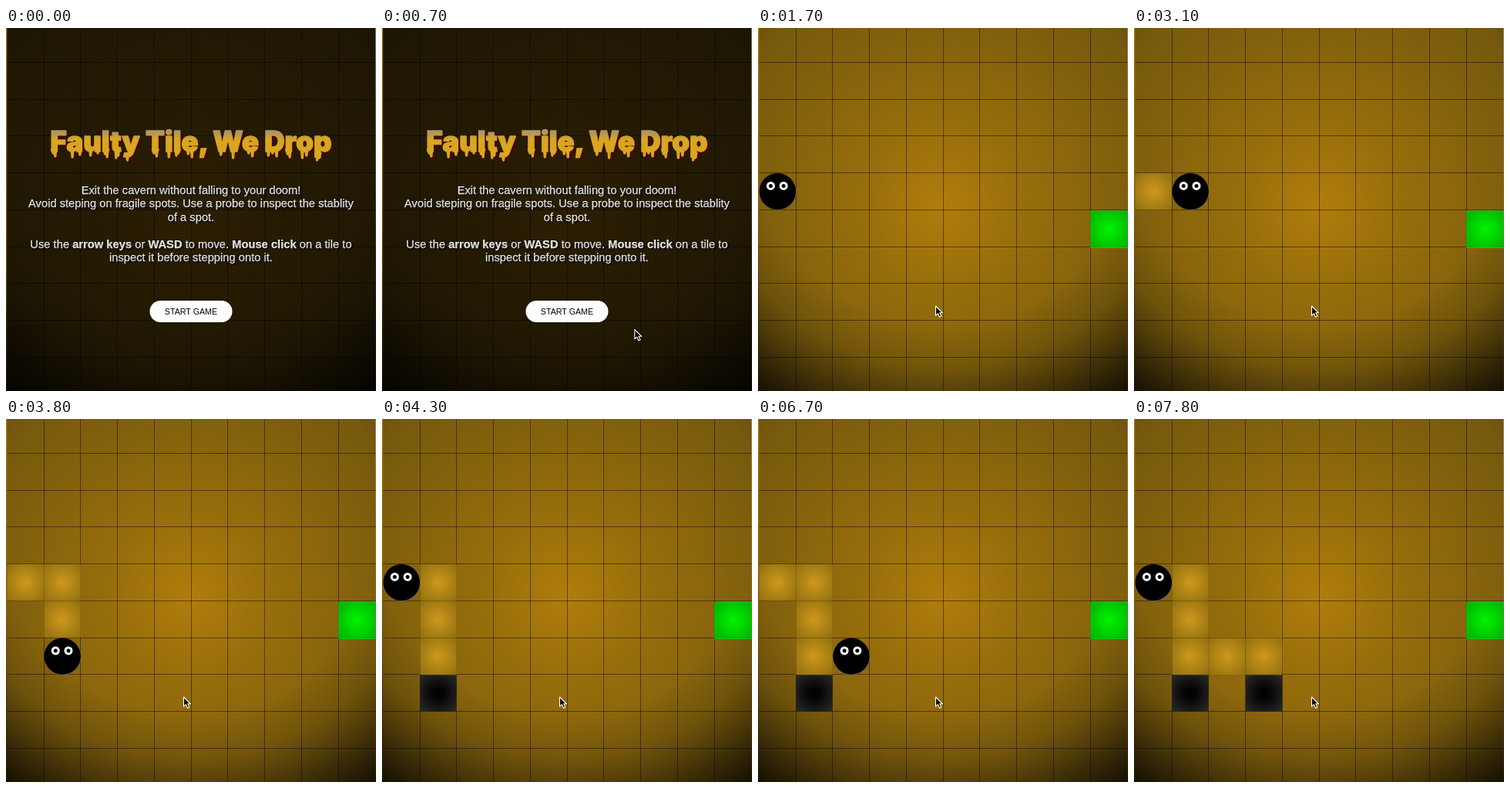
An HTML page for the animation above (8000 ms loop, 480x470 px).

```html
<!DOCTYPE html>
<html lang="en">
<head>
<meta charset="utf-8">
<title>Cavern game</title>
<style>
  html, body { margin: 0; width: 100%; height: 100%; overflow: hidden; background: #000; }
  svg { display: block; width: 480px; height: 470px; }
  text { text-anchor: middle; }
  .copy { font: 14.73px "Liberation Sans", Arial, sans-serif; fill: #fff; stroke: #fff; stroke-width: .25; text-shadow: 1px 1px 2px #000; }
  .copy tspan { font-weight: bold; }
  .label { font: 10.7px "Liberation Sans", Arial, sans-serif; }
  .title { font: 900 36.4px Inter, Roboto, sans-serif; }
</style>
</head>
<body>
<svg id="stage" viewBox="0 0 480 470" xmlns="http://www.w3.org/2000/svg">
  <defs>
    <radialGradient id="floor" gradientUnits="userSpaceOnUse" cx="240" cy="230" r="340">
      <stop offset="0" stop-color="#b07d0c"/>
      <stop offset=".33" stop-color="#966d0b"/>
      <stop offset=".7" stop-color="#80600d"/>
      <stop offset="1" stop-color="#72560f"/>
    </radialGradient>
    <radialGradient id="shade" gradientUnits="userSpaceOnUse" cx="240" cy="130" r="420">
      <stop offset=".6" stop-opacity="0"/>
      <stop offset=".74" stop-opacity=".14"/>
      <stop offset=".82" stop-opacity=".34"/>
      <stop offset="1" stop-opacity=".84"/>
    </radialGradient>
    <radialGradient id="gold" r=".68">
      <stop offset="0" stop-color="#cd981c"/>
      <stop offset="1" stop-color="#92700f"/>
    </radialGradient>
    <radialGradient id="hole" r=".7">
      <stop offset="0" stop-color="#000"/>
      <stop offset=".25" stop-color="#060606"/>
      <stop offset="1" stop-color="#2b2b2b"/>
    </radialGradient>
    <radialGradient id="green" r=".7">
      <stop offset="0" stop-color="#00f400"/>
      <stop offset="1" stop-color="#00ae00"/>
    </radialGradient>
    <linearGradient id="rim" x2="0" y2="1">
      <stop offset="0" stop-color="#b87c05"/>
      <stop offset=".5" stop-color="#8a5f05"/>
      <stop offset="1" stop-color="#1c1403"/>
    </linearGradient>
    <linearGradient id="glint" x2="0" y2="1">
      <stop offset="0" stop-color="#a89c84" stop-opacity=".8"/>
      <stop offset=".4" stop-color="#8a7a50" stop-opacity=".6"/>
      <stop offset=".8" stop-color="#5a4a20" stop-opacity=".2"/>
    </linearGradient>
    <linearGradient id="bevel" x2="0" y2="1">
      <stop offset="0" stop-color="#8d8480"/>
      <stop offset="1" stop-color="#5c4a3a"/>
    </linearGradient>
    <linearGradient id="paint" gradientUnits="userSpaceOnUse" x1="0" y1="132" x2="0" y2="172">
      <stop offset="0" stop-color="#a8946a"/>
      <stop offset=".14" stop-color="#b8994f"/>
      <stop offset=".3" stop-color="#daa520"/>
      <stop offset="1" stop-color="#daa520"/>
    </linearGradient>
  </defs>

  <rect width="480" height="470" fill="url(#floor)"/>
  <rect width="480" height="470" fill="url(#shade)"/>
  <path id="grid" fill="none" stroke="#000" stroke-opacity=".45"/>
  <g id="tiles"></g>
  <g id="exit">
    <rect x="431.5" y="236.5" width="48.5" height="48.5" fill="url(#green)"/>
    <rect x="432" y="237" width="47.5" height="47.5" fill="none" stroke="#38c038" stroke-opacity=".7"/>
  </g>
  <g id="player">
    <circle cx=".7" cy=".7" r="23.8" fill="#6a6458"/>
    <circle r="23.7"/>
    <g fill="#000" stroke="#fff" stroke-width="3">
      <circle cx="-8.9" cy="-7.2" r="4"/>
      <circle cx="7.8" cy="-7.2" r="4"/>
    </g>
  </g>

  <g id="menu">
    <rect x="1" width="479" height="470" fill-opacity=".75"/>
    <g id="title" class="title"></g>
    <g class="copy">
      <text x="240" y="215">Exit the cavern without falling to your doom!</text>
      <text x="240" y="232.4">Avoid steping on fragile spots. Use a probe to inspect the stablity</text>
      <text x="240" y="249.8">of a spot.</text>
      <text x="240" y="284.6">Use the <tspan>arrow keys</tspan> or <tspan>WASD</tspan> to move. <tspan>Mouse click</tspan> on a tile to</text>
      <text x="240" y="302">inspect it before stepping onto it.</text>
    </g>
    <rect x="186.5" y="353" width="107" height="28" rx="14" fill="#fff"/>
    <rect id="button" x="186.5" y="353.7" width="107.8" height="26.8" rx="13.4" fill="#b8860b" stroke="url(#bevel)" stroke-width="1.6"/>
    <text id="label" class="label" x="240" y="370.6">START GAME</text>
  </g>
  <rect width="1.2" height="470" fill="url(#rim)"/>
  <rect x="479" width="1" height="470" fill="url(#glint)"/>

  <path id="arrow" d="M0 0V12.2L2.9 9.6L5 14.3L7.3 13.3L5.2 8.8H9Z" stroke="#fff" stroke-width="1.1" stroke-linejoin="round"/>
  <path id="hand" d="M-2 -5.5Q-.8 -6.8 .2 -5.3L1 -1.8Q2.3 -2.6 3 -1.2Q4.4 -1.8 5 -.4Q6.7 -.6 6.8 1.2L6.5 4.2L5.5 6.8H-.6L-4.4 2Q-4.8 .3 -3 .6L-1.2 2Z" fill="#fff" stroke="#000" stroke-width="1" stroke-linejoin="round"/>
</svg>
<script>
const LOOP = 8000, CELL = 47.8, LEFT = 1.2, TOP = -3.6;
const GAME_AT = 1700, HOVER_AT = 1000;
const $ = id => document.getElementById(id);
const cellX = c => LEFT + c * CELL;
const cellY = r => TOP + r * CELL;

function make(tag, attrs, parent) {
  const el = document.createElementNS("http://www.w3.org/2000/svg", tag);
  for (const k in attrs) el.setAttribute(k, attrs[k]);
  parent.appendChild(el);
  return el;
}

// time, column, row of the player after each step
const steps = [
  [1700, 0, 4], [2900, 1, 4], [3500, 1, 5], [3800, 1, 6], [4300, 0, 4],
  [5400, 1, 4], [5900, 1, 5], [6200, 1, 6], [6600, 2, 6], [7000, 3, 6], [7800, 0, 4]
];
const holes = [[4300, 1, 7], [7800, 3, 7]];

const tile = (c, r, fill) => make("rect", {
  x: cellX(c) + .3, y: cellY(r) + .3, width: CELL - .3, height: CELL - .3, fill: `url(#${fill})`
}, $("tiles"));

const visited = [];
for (const [at, c, r] of steps)
  if (!visited.some(v => v.c === c && v.r === r)) visited.push({ at, c, r, el: tile(c, r, "gold") });
const pits = holes.map(([at, c, r]) => ({ at, el: tile(c, r, "hole") }));

let lines = "";
for (let i = 1; i < 10; i++) {
  const x = Math.floor(cellX(i)) + .5, y = Math.floor(cellY(i)) + .5;
  lines += `M${x} 0V470M1 ${y}H480`;
}
$("grid").setAttribute("d", lines);

// Drip positions as fractions of each letter's width
const drips = {
  F: [.17, .3], a: [.35, .8], u: [.4, .8], l: [.4, .65], t: [.5, .68], y: [.3],
  T: [.44, .58], i: [.5], e: [.4, .62], W: [.28, .7], D: [.2, .4, .6],
  r: [.25, .45], o: [.36, .6], p: [.2, .32]
};
const WORDS = "Faulty Tile, We Drop", BASE = 160;

function drawTitle() {
  const layers = [["#3d0d02", 2.5, 3], ["url(#paint)", 0, 0]];
  for (const [paint, dx, dy] of layers) {
    const g = make("g", { fill: paint, stroke: paint, "stroke-width": 1.4, "stroke-linejoin": "round",
      transform: `translate(${dx} ${dy})` }, $("title"));
    const text = make("text", { x: 240, y: BASE }, g);
    text.textContent = WORDS;
    let d = "";
    [...WORDS].forEach((ch, i) => {
      const box = text.getExtentOfChar(i);
      (drips[ch] || []).forEach((f, k) => {
        const x = box.x + box.width * f;
        const deep = "yp".includes(ch) ? 5 : 0;
        const end = BASE + deep + 2 + (i * 5 + k * 4) % 7;
        d += `M${x - 2.6} ${BASE + deep - 3}Q${x - 1.3} ${BASE + deep} ${x - 1} ${end}`
          + `A1 1 0 0 0 ${x + 1} ${end}Q${x + 1.3} ${BASE + deep} ${x + 2.6} ${BASE + deep - 3}Z`;
      });
    });
    make("path", { d }, g);
  }
}
drawTitle();

const clamp = v => Math.max(0, Math.min(1, v));
const smooth = v => v * v * (3 - 2 * v);
const show = (el, on) => el.setAttribute("visibility", on ? "visible" : "hidden");
const place = (el, x, y) => el.setAttribute("transform", `translate(${x} ${y})`);

function draw(t) {
  const playing = t >= GAME_AT, hover = clamp((t - HOVER_AT) / 200);
  $("menu").style.display = playing ? "none" : "";

  let now = steps[0];
  for (const s of steps) if (t >= s[0]) now = s;
  const [, col, row] = now;
  place($("player"), cellX(col) + CELL / 2 + .3, cellY(row) + CELL / 2 + .1);
  show($("player"), playing);
  show($("exit"), playing);
  for (const v of visited) show(v.el, t >= v.at && !(v.c === col && v.r === row));
  for (const p of pits) show(p.el, t >= p.at);

  $("button").setAttribute("opacity", hover);
  $("label").setAttribute("fill", hover > 0 ? "#fff" : "#000");
  $("label").style.fontWeight = hover > 0 ? "bold" : "normal";

  const k = smooth(clamp((t - 150) / 950));
  const x = 486 + (230.5 - 486) * k, y = 440 + (360 - 440) * k;
  const pointing = !playing && t >= HOVER_AT;
  show($("arrow"), t >= 150 && !pointing);
  show($("hand"), pointing);
  place($("arrow"), x, y);
  place($("hand"), x + 2, y + 8.5);
}

function tick(ms) {
  draw(ms % LOOP);
  requestAnimationFrame(tick);
}
draw(0);
requestAnimationFrame(tick);
</script>
</body>
</html>
```
